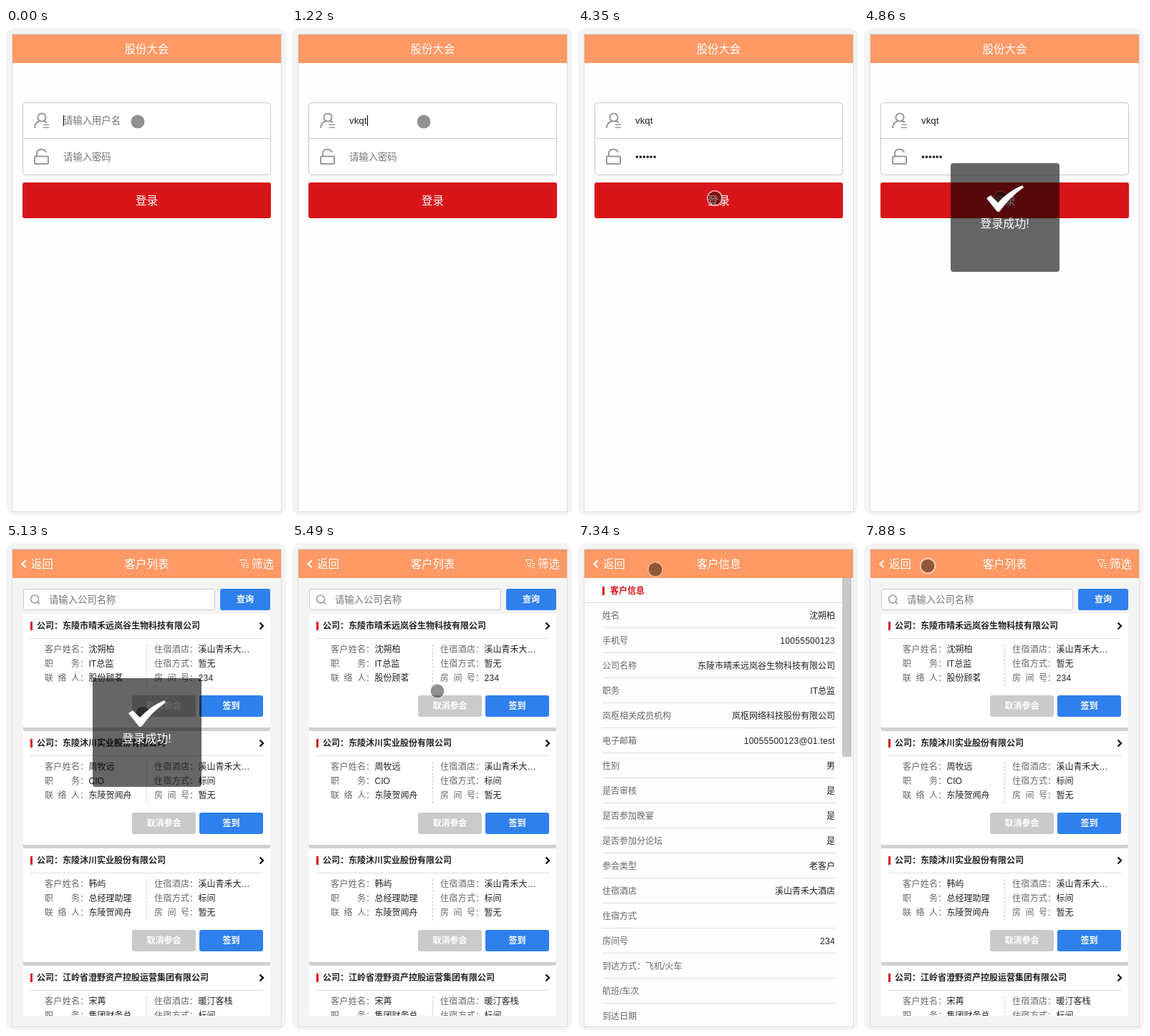
Write an HTML page that moves like this. It is 391 px wide and 681 px high and loops after 8000 ms.

```html
<!DOCTYPE html>
<html lang="zh-CN">
<head>
<meta charset="utf-8">
<title>股份大会</title>
<style>
html, body { margin: 0; width: 100%; height: 100%; overflow: hidden; background: #fff; }
svg { display: block; width: 391px; height: 681px; }
text { font-family: "Liberation Sans", "Noto Sans CJK SC", "Noto Sans CJK", sans-serif; fill: #222; white-space: pre; }
.white { fill: #fff; }
.grey { fill: #666; }
.hint { fill: #757575; }
.red { fill: #d81519; }
.bold { font-weight: bold; }
.mid { text-anchor: middle; }
.end { text-anchor: end; }
.num { letter-spacing: .3px; }
.icon { fill: none; stroke: #999; stroke-width: 2; }
</style>
</head>
<body>
<svg id="stage" viewBox="0 0 391 681"></svg>
<script>
const LOOP = 8000;
const ORANGE = '#ff9965', BLUE = '#2f80ed', RED = '#d81519';

const rect = (x, y, w, h, fill, extra = '') =>
  `<rect x="${x}" y="${y}" width="${w}" height="${h}" fill="${fill}" ${extra}/>`;
const box = (x, y, w, h, r) =>
  rect(x + .5, y + .5, w - 1, h - 1, '#fff', `stroke="#c8c8c8" rx="${r}"`);
const path = (d, stroke, width, extra = '') =>
  `<path d="${d}" fill="none" stroke="${stroke}" stroke-width="${width}" ${extra}/>`;
const hline = (x, y, w, color = '#ddd') => rect(x, y, w, 1, color);
// y is the visual middle of the line
const text = (x, y, s, cls = '', size = 12) =>
  `<text x="${x}" y="${y + size * .37}" font-size="${size}" class="${cls}">${s}</text>`;
const button = (x, y, w, h, fill, s, size = 12, cls = 'bold') =>
  rect(x, y, w, h, fill, 'rx="3"') + text(x + w / 2, y + h / 2, s, `white mid ${cls}`, size);

const header = (title, back) =>
  rect(9, 9, 375, 40, ORANGE) + hline(9, 9, 375, '#e0a58a') +
  text(196.5, 29, title, 'white mid', 15.4) +
  (back ? path('M27.5 24.5L22.5 29.3L27.5 34', '#fff', 2.4) + text(35, 29, '返回', 'white', 15.4) : '');

function login() {
  return rect(9, 49, 375, 628, '#fefefe') + header('股份大会') +
    box(23, 104, 347, 102, 4) + hline(24, 154, 345, '#c8c8c8') +
    `<g class="icon">
      <circle cx="50" cy="125" r="5.6"/>
      <path d="M40 140C40 134.500 43 131.500 47 130M53 130L57 132"/>
      <path d="M52 135.300H60M52 139.300H60" stroke-width="1.500"/>
      <rect x="40" y="179.500" width="19" height="10.500" rx="1"/>
      <path d="M43 179V175.500C43 168 54 168 56 174"/>
    </g>` +
    `<g id="userHint">${text(80, 129, '请输入用户名', 'hint', 13.33)}</g>` +
    `<g id="passHint">${text(80, 180, '请输入密码', 'hint', 13.33)}</g>` +
    '<text id="user" x="80" y="134" font-size="13.33"/>' +
    '<text id="pass" x="80" y="185" font-size="13.33" class="num"/>' +
    '<rect id="caret" width="1" height="15" fill="#000"/>' +
    button(23, 216, 347, 50, RED, '登录', 15.4, '');
}

// Label characters are spread evenly over four character widths
function field(x, y, label, value) {
  const step = 37 / (label.length - 1);
  const xs = [...label].map((_, i) => x + i * step).join(' ');
  return text(`${xs} ${x + 49}`, y, label + '：', 'grey') +
    text(x + 61.5, y, value, /^\d/.test(value) ? 'num' : '');
}

function card(y, [company, name, job, contact, hotel, stay, room]) {
  return rect(24, y + 4, 345, 160, '#d0d0d0', 'rx="3"') +
    rect(24, y, 345, 159, '#fff', 'rx="2"') +
    rect(34, y + 11, 3, 12, RED) + text(43, y + 17, '公司：' + company, 'bold') +
    path(`M354.500 ${y + 12.5}L359 ${y + 17}L354.500 ${y + 21.500}`, '#000', 2.2) +
    hline(34, y + 34, 325) +
    path(`M196.500 ${y + 43}V${y + 101}`, '#ccc', 1, 'stroke-dasharray="3 2"') +
    field(54, y + 50, '客户姓名', name) + field(54, y + 70, '职务', job) +
    field(54, y + 90, '联络人', contact) +
    field(207, y + 50, '住宿酒店', hotel) + field(207, y + 70, '住宿方式', stay) +
    field(207, y + 90, '房间号', room) +
    button(176, y + 114, 89, 30, '#cacaca', '取消参会') +
    button(270, y + 114, 89, 30, BLUE, '签到');
}

const HOTEL = '溪山青禾大…', MAKER = '东陵沐川实业股份有限公司', AGENT = '东陵贺闻舟';
const FIRM = '东陵市晴禾远岚谷生物科技有限公司';
const guests = [
  [FIRM, '沈朔柏', 'IT总监', '股份顾茗', HOTEL, '暂无', '234'],
  [MAKER, '周牧远', 'CIO', AGENT, HOTEL, '标间', '暂无'],
  [MAKER, '韩屿', '总经理助理', AGENT, HOTEL, '标间', '暂无'],
  ['江岭省澄野资产控股运营集团有限公司', '宋苒', '集团财务总', AGENT, '暖汀客栈', '标间', '暂无']
];

function list() {
  return rect(9, 49, 375, 628, '#f4f4f4') + header('客户列表', true) +
    path('M326 23.500H336L332.500 28V34L329.500 32V28ZM335 28.500H339M335 31.500H339M335 34.500H339', '#fff', .9) +
    text(343, 29, '筛选', 'white', 15.4) +
    box(24, 64, 268, 30, 3) +
    '<circle cx="40" cy="78.500" r="5.500" class="icon" style="stroke-width:1.500"/>' +
    path('M44 82.500L47 85.500', '#999', 1.6) +
    text(60, 79, '请输入公司名称', 'hint', 13.33) +
    button(299, 64, 70, 30, BLUE, '查询') +
    `<g clip-path="url(#view)">${guests.map((g, i) => card(99 + 164 * i, g)).join('')}</g>`;
}

const PHONE = '10055500123';
const details = [
  ['姓名', '沈朔柏'], ['手机号', PHONE], ['公司名称', FIRM], ['职务', 'IT总监'],
  ['岚枢相关成员机构', '岚枢网络科技股份有限公司'], ['电子邮箱', PHONE + '@01.test'],
  ['性别', '男'], ['是否审核', '是'], ['是否参加晚宴', '是'], ['是否参加分论坛', '是'],
  ['参会类型', '老客户'], ['住宿酒店', '溪山青禾大酒店'], ['住宿方式', ''], ['房间号', '234'],
  ['到达方式：飞机/火车', ''], ['航班/车次', ''], ['到达日期', '']
];

function info() {
  return rect(9, 49, 375, 628, '#fefefe') + header('客户信息', true) +
    rect(34, 61, 3, 12, RED) + text(45, 67, '客户信息', 'bold red') + hline(9, 83, 360) +
    details.map(([label, value], i) => {
      const y = 102 + 35 * i;
      return text(34, y, label, 'grey') +
        text(359, y, value, 'end' + (/^\d/.test(value) ? ' num' : '')) +
        (y < 650 ? hline(34, y + 16, 325) : '');
    }).join('') +
    rect(369, 49, 13, 250, '#c8c8c8');
}

stage.innerHTML =
  '<clipPath id="view"><rect x="9" y="49" width="375" height="612"/></clipPath>' +
  rect(0, 0, 391, 681, '#f4f4f4', 'rx="12"') +
  `<g id="login">${login()}</g><g id="list">${list()}</g><g id="info">${info()}</g>` +
  rect(8.5, 8.5, 376, 668, 'none', 'stroke="#dcdcdc"') +
  `<g id="pointer"><circle r="9.500" fill="#000" fill-opacity=".43"/>
    <circle id="ring" r="10.300" fill="none" stroke="#fff" stroke-opacity=".5"/></g>` +
  `<g id="toast">${rect(121, 189, 152, 152, '#000', 'rx="4" fill-opacity=".6"')}` +
  '<path d="M171 238L177 234L187 244Q202 228 221 220L223 223Q204 236 189 257H186Z" fill="#fff"/>' +
  text(196.5, 273, '登录成功!', 'white mid', 16) + '</g>';

const el = id => document.getElementById(id);
const show = (id, on) => { el(id).style.display = on ? '' : 'none'; };
const last = (rows, t) => rows.findLast(r => r[0] <= t);
const count = (times, t) => times.filter(k => k <= t).length;

const userKeys = [670, 850, 1030, 1220];
const passKeys = [2300, 2450, 2600, 3130, 3380, 3680];
const pages = [[0, 'login'], [5000, 'list'], [6490, 'info'], [7880, 'list']];
const carets = [[0, 1], [270, 0], [670, 1], [2020, 0], [2300, 1], [4080, 0]];
// time, x, y, pressed
const moves = [
  [0, 184, 131], [4080, 187, 170], [4210, 190, 222], [4350, 191, 238, 1], [4740, 191, 238],
  [5490, 203, 207], [5640, 222, 144], [5790, 262, 129], [5920, 292, 122], [6050, 307, 121],
  [6180, 297, 119], [6890, 262, 104], [7020, 205, 78], [7150, 148, 52], [7290, 108, 37],
  [7420, 89, 32], [7700, 89, 32, 1]
];

function draw(t) {
  const page = last(pages, t)[1];
  for (const id of ['login', 'list', 'info']) show(id, id === page);

  const typed = count(userKeys, t), dots = count(passKeys, t);
  el('user').textContent = 'vkqt'.slice(0, typed);
  el('pass').textContent = '•'.repeat(dots);
  show('userHint', !typed);
  show('passHint', !dots);
  const inPass = t >= 1620;
  el('caret').setAttribute('x', 80 + (inPass ? dots * 5 : [0, 7, 13, 21, 25][typed]));
  el('caret').setAttribute('y', inPass ? 173 : 122);
  show('caret', last(carets, t)[1]);

  const [, x, y, pressed] = last(moves, t);
  el('pointer').setAttribute('transform', `translate(${x} ${y})`);
  el('ring').setAttribute('stroke-width', pressed ? 2 : 1);
  show('toast', t >= 4740 && t < 5370);
}

function tick(now) {
  draw(now % LOOP);
  requestAnimationFrame(tick);
}
draw(0);
requestAnimationFrame(tick);
</script>
</body>
</html>
```
